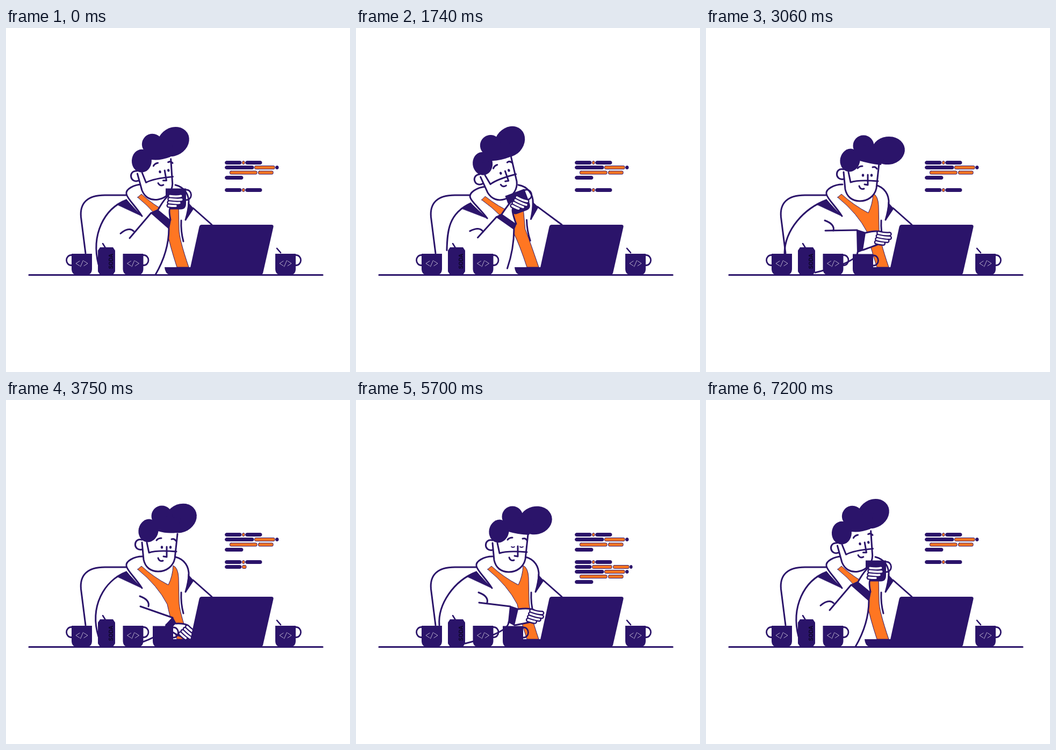
These frames come from a looping animation (640 px wide and 640 px high, 7230 ms). An HTML page with a canvas:

```html
<!DOCTYPE html>
<html lang="en">
<head>
<meta charset="utf-8">
<title>Coffee and code</title>
<style>
html, body { margin: 0; width: 100%; height: 100%; overflow: hidden; background: #fff; }
canvas { display: block; width: 100vw; height: 100vh; }
</style>
</head>
<body>
<canvas id="stage" width="640" height="640"></canvas>
<script>
const ctx = document.getElementById('stage').getContext('2d');
const NAVY = '#2b146a', ORANGE = '#ff7622', WHITE = '#fff';
const LOOP = 7230, RAD = Math.PI / 180;

// head: chin x, y, tilt, face shift x, y, front lock shift x, y
// torso: shift x, y, tilt
// sleeve: curve control and end of the outer sleeve
// arm: elbow, cuff back top, cuff back bottom, cuff front top, cuff front bottom, knuckles, sleeve end
// bend: elbow crease angle, finger angle
// cup: centre x, y, tilt
const sip = {
  head: [283, 317, -10, 5, -5, 4, -2], torso: [0, 0, 0], sleeve: [158, 385, 172, 440],
  arm: [230, 391, 270, 344, 303, 373, 283, 338, 306, 357, 308, 322, 278, 459],
  bend: [-60, 8], cup: [316, 318, 0]
};
const drink = {
  head: [277, 316, -22, 0, -3, 0, 2], torso: [-12, 2, -5], sleeve: [176, 375, 176, 412],
  arm: [232, 390, 261, 338, 302, 357, 270, 331, 303, 345, 296, 301, 290, 449],
  bend: [-60, 28], cup: [298, 299, -26]
};
const lower = {
  head: [277, 317, -9, 4, -3, 4, -2], torso: [-4, 0, 0], sleeve: [147, 385, 143, 419],
  arm: [206, 390, 263, 401, 264, 438, 277, 401, 279, 436, 308, 413, 250, 441],
  bend: [0, 34], cup: [317, 417, 0]
};
const place = {
  ...lower, head: [282, 318, -3, 1, -2, 7, 1], torso: [-2, 0, 0],
  arm: lower.arm.map((v, i) => v + (i < 2 || i > 11 ? 0 : i % 2 ? 20 : -25)),
  cup: [292, 440, 0]
};
const reach = {
  head: [286, 320, 0, -1, -3, 11, 5], torso: [0, 0, 0], sleeve: [147, 375, 146, 419],
  arm: [222, 377, 281, 376, 282, 417, 297, 381, 292, 413, 323, 391, 203, 455],
  bend: [0, 14], cup: [292, 440, 0]
};
const type = {
  head: [283, 317, 0, 0, 0, 0, 0], torso: [0, 0, 0], sleeve: [155, 385, 172, 440],
  arm: [250, 384, 310, 405, 298, 418, 316, 416, 304, 428, 333, 430, 240, 455],
  bend: [0, 45], cup: [292, 440, 0]
};
const rest = {
  head: [284, 318, 0, 1, -2, 8, 3], torso: [0, 0, 0], sleeve: [152, 380, 155, 419],
  arm: [229, 377, 287, 384, 284, 413, 302, 389, 295, 419, 327, 402, 203, 453],
  bend: [0, 20], cup: [292, 440, 0]
};
const timeline = [
  [0, sip], [300, sip], [1000, drink], [1500, drink], [2310, lower], [2650, place],
  [3060, reach], [3500, type], [5200, type], [5700, rest], [6150, place],
  [6550, lower], [7100, sip], [LOOP, sip]
];

function poseAt(t) {
  let i = 0;
  while (t >= timeline[i + 1][0]) i++;
  const [t0, a] = timeline[i], [t1, b] = timeline[i + 1];
  const u = (t - t0) / (t1 - t0), k = u * u * (3 - 2 * u);
  const pose = {};
  for (const part in a) pose[part] = a[part].map((v, j) => v + (b[part][j] - v) * k);
  return pose;
}

function shape(d, fill, stroke, width = 3) {
  const path = d instanceof Path2D ? d : new Path2D(d);
  if (fill) { ctx.fillStyle = fill; ctx.fill(path); }
  if (stroke) { ctx.strokeStyle = stroke; ctx.lineWidth = width; ctx.stroke(path); }
}
const line = (d, width) => shape(d, null, NAVY, width);

function blob(x, y, rx, ry = rx, tilt = 0) {
  const p = new Path2D();
  p.ellipse(x, y, rx, ry, tilt * RAD, 0, 7);
  shape(p, NAVY);
}

function within(x, y, tilt, draw) {
  ctx.save();
  ctx.translate(x, y);
  ctx.rotate(tilt * RAD);
  draw();
  ctx.restore();
}

function cup(x, y, side, tilt = 0, label = true) {
  within(x, y, tilt, () => {
    const ring = new Path2D();
    ring.ellipse(side * 19.5, -7.5, 9, 9.5, 0, 0, 7);
    line(ring, 2.8);
    shape('M-19-19.5H19V8Q19 19.5 9 19.5H-9Q-19 19.5-19 8Z', NAVY);
    if (label) shape('M-4-6L-11-1.5L-4 3M2.5-7L-2.5 4.5M4-6L11-1.5L4 3', null, '#b8aecb', 1);
  });
}

function can() {
  line('M180 401L185 409', 2.6);
  shape('M175 408H199L203 414V453L199 459H175L171 453V414Z', NAVY);
  within(196, 434, -90, () => {
    ctx.fillStyle = '#0d0626';
    ctx.font = 'bold 10px Inter, sans-serif';
    ctx.textAlign = 'center';
    ctx.textBaseline = 'middle';
    ctx.fillText('SODA', 0, 0);
  });
}

// Code rows: left, right, colour
const title = [[407, 438, NAVY], [439, 444, ORANGE], [445, 476, NAVY]];
const call = [[407, 461, NAVY], [462, 500, ORANGE], [501, 507, NAVY]];
const args = [[416, 467, ORANGE], [469, 497, ORANGE]];
const end = [[407, 441, NAVY]];
const open = [[407, 438, NAVY], [439, 476, ORANGE], [478, 508, ORANGE], [509, 514, NAVY]];
const fixedRows = [[250.5, title], [259.5, call], [269, args], [278.5, end], [301.5, title]];
const typedRows = [[310.5, open], [319.5, call], [328.5, args], [338.5, end]];

function codeRows(rows, budget) {
  for (const [y, bars] of rows) for (const [x0, x1, color] of bars) {
    const w = Math.min(x1 - x0, budget);
    budget -= x1 - x0;
    if (w < 1) return;
    const p = new Path2D();
    p.roundRect(x0 + .5, y - 3, w - .5, 6, Math.min(color === NAVY ? 3 : 2, w / 2));
    shape(p, color, NAVY, 1);
  }
}

function typedLength(t) {
  if (t < 3500) return 0;
  if (t < 6300) return (t - 3500) * .155;
  return Math.max(0, 330 * (1 - (t - 6300) / 500));
}

function torso(p) {
  const [tx, ty, tilt] = p.torso, c = Math.cos(tilt * RAD), s = Math.sin(tilt * RAD);
  const at = (x, y) => {
    const dx = x - 290, dy = y - 330;
    return `${290 + tx + dx * c - dy * s} ${330 + ty + dx * s + dy * c} `;
  };
  const [cx, cy, ex, ey] = p.sleeve;
  line(`M${at(224, 320)}C${at(182, 336)}${cx} ${cy} ${ex} ${ey}`);
  line(`M${at(348, 335)}L383 366`);
  const hood = `M${at(254, 291)}C${at(238, 291)}${at(222, 300)}${at(224, 309)}C${at(226, 318)}${at(240, 330)}${at(253, 350)}`;
  shape(`${hood}L${at(300, 330)}Z`, WHITE);
  line(hood);
  line(`M${at(315, 292)}C${at(332, 296)}${at(341, 310)}${at(340, 327)}C${at(339, 340)}${at(336, 350)}${at(334, 357)}`);
  shape(`M${at(206, 328)}L${at(225, 320)}Q${at(236, 333)}${at(253, 350)}Z`, NAVY, NAVY, 1);
  shape(`M${at(339, 325)}L${at(349, 336)}L${at(335, 357)}Q${at(339, 341)}${at(339, 325)}Z`, NAVY, NAVY, 1);
  shape(`M${at(245, 315)}L${at(252, 309)}Q${at(275, 330)}${at(302, 344)}Q${at(310, 328)}${at(311, 308)}` +
    `Q${at(320, 312)}${at(321, 330)}L${at(322, 375)}Q322 392 340 445L318 445Q305 405 ${at(300, 380)}Q${at(282, 345)}${at(245, 315)}Z`, ORANGE, NAVY, 1);
  line(`M${at(326, 358)}Q${at(325, 378)}${at(330, 397)}`);
}

function face(p, closed) {
  const [x, y, tilt, fx, fy, lockX, lockY] = p.head;
  within(x, y, tilt, () => {
    shape('M-30-57C-47-61-47-35-29-39', WHITE, NAVY);
    shape('M-30-52L-27-20C-24-6-14 2 0 2C16 2 28-8 31-22L36-68', WHITE, NAVY);
    line('M-21-52L-17-33Q-2-38 34-35');
    blob(42 + lockX, -97 + lockY, 31, 26, lockX * 2 - 30);
    blob(7, -101, 19.5);
    blob(-18, -74, 18.5, 21.5, 12);
    shape(`M-18-75L7-102L${42 + lockX} ${-97 + lockY}L${34 + lockX / 2} ${-70 + lockY}Q16-68 0-73Z`, NAVY);
    ctx.translate(fx, fy);
    line('M16-44L16-25L10-26');
    line('M0-23Q2-16 9-18');
    line('M-3-56Q0-60 6-60M25-58Q30-60 33-55');
    if (closed) line('M4-43Q7-41 10-43M20-43Q23-41 26-43', 1.8);
    else { blob(7, -43, 2.2, 2.7); blob(23, -43, 2.2, 2.7); }
  });
}

function sleeve(p) {
  const [ex, ey, ax, ay, bx, by, cx, cy, dx, dy, , , sx, sy] = p.arm;
  const under = `L${bx} ${by}Q${bx} ${(by + sy) / 2} ${sx} ${sy}`;
  shape(`M${ex} ${ey}L${ax} ${ay}${under}Z`, WHITE);
  line(`M${ex} ${ey}L${ax} ${ay}M${bx} ${by}${under}`);
  within(ex, ey, p.bend[0], () => line('M-1-19Q18-12 15 0'));
  const midX = (ax + bx) / 2, midY = (ay + by) / 2;
  const outX = (cx + dx) / 2, outY = (cy + dy) / 2;
  shape(`M${ax} ${ay}L${cx} ${cy}Q${outX} ${outY} ${dx} ${dy}L${bx} ${by}Q${midX} ${midY} ${ax} ${ay}Z`, NAVY, NAVY, 2);
}

function hand(p) {
  const [, , , , , , ax, ay, bx, by, kx, ky] = p.arm;
  const a = p.bend[1] * RAD, ux = Math.cos(a), uy = Math.sin(a);
  const at = (u, v) => `${kx + u * ux - v * uy} ${ky + u * uy + v * ux} `;
  shape(`M${ax} ${ay}Q${at(-10, -13)}${at(0, -12)}L${at(0, 12)}Q${at(-4, 15)}${bx} ${by}`, WHITE, NAVY);
  let fingers = '';
  [16, 18, 15, 9].forEach((len, i) => {
    const v = i * 6 - 9;
    fingers += `M${at(-4, v)}Q${at(len / 2, v)}${at(len, v * 1.1 - 2)}`;
  });
  line(fingers, 8.6);
  shape(fingers, null, WHITE, 3.8);
}

function laptop() {
  shape('M295 445H350V459H304Q296 457 295 445Z', NAVY);
  shape('M364 366H494Q498 366 497.5 370L478 456Q477 459 473 459H340L359.5 370Q360.5 366 364 366Z', NAVY);
}

function draw(t) {
  const p = poseAt(t);
  if (t > 3500 && t < 5200) {
    const tap = Math.sin((t - 4470) / 60);
    p.arm[10] += tap;
    p.arm[11] += tap * 2;
  }
  const holding = t < 2700 || t > 6120;
  const closed = (t > 800 && t < 1700) || (t > 5620 && t < 5800);
  const mug = () => cup(p.cup[0], p.cup[1], 1, p.cup[2], false);

  ctx.fillStyle = WHITE;
  ctx.fillRect(0, 0, 640, 640);
  ctx.lineCap = ctx.lineJoin = 'round';
  line('M148 419L139.5 352C137 326 151 311 184 311H' + (224 + p.torso[0]));
  torso(p);
  face(p, closed);
  sleeve(p);
  if (holding) mug();
  hand(p);
  laptop();
  if (!holding) mug();
  cup(141, 439.5, -1);
  can();
  cup(236.5, 439.5, 1);
  line('M504 410L511 418', 2.6);
  cup(520, 439.5, 1);
  line('M43 459.5H589', 3);
  codeRows(fixedRows, Infinity);
  codeRows(typedRows, typedLength(t));
}

const start = performance.now();
function frame() {
  draw((performance.now() - start) % LOOP);
  requestAnimationFrame(frame);
}
frame();
</script>
</body>
</html>
```
